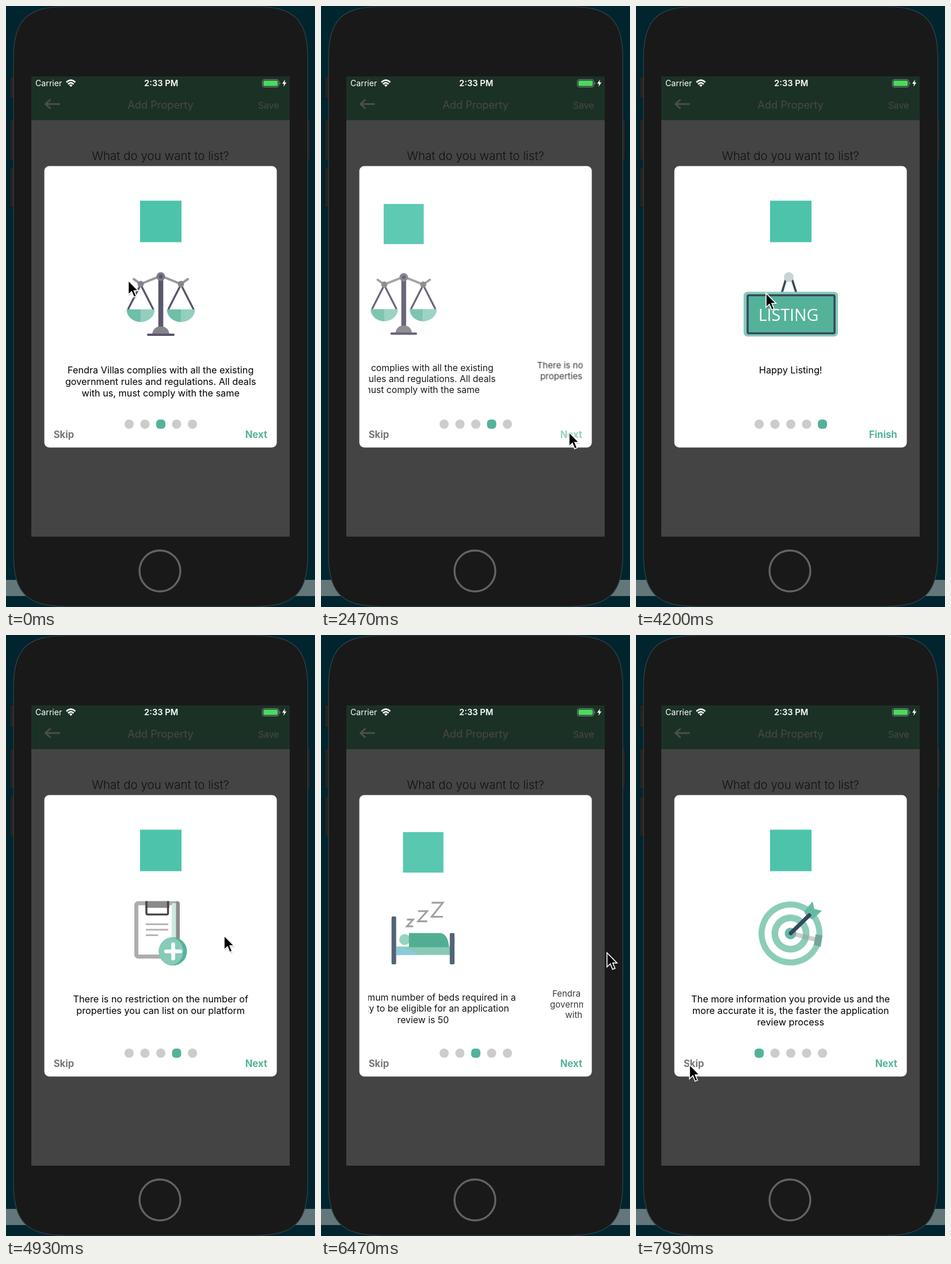
Recreate the animation shown at these times as an HTML page. Size 537 by 1042 pixels, loop 8000 ms.

```html
<!DOCTYPE html>
<html lang="en">
<head>
<meta charset="utf-8">
<title>Onboarding carousel</title>
<style>
  html, body { margin: 0; width: 100%; height: 100%; overflow: hidden; background: #01252f; }
  svg { display: block; width: 537px; height: 1042px; font-family: Inter, "Open Sans", sans-serif; }
  .caption { font-size: 16.25px; text-anchor: middle; fill: #000; }
  .btn { font-size: 16.7px; font-weight: 700; fill: #55b29a; }
  .nav { fill: #474947; }
  .end { text-anchor: end; }
  .mid { text-anchor: middle; }
  .line { fill: none; }
</style>
</head>
<body>
<svg viewBox="0 0 537 1042" xmlns="http://www.w3.org/2000/svg">
  <defs>
    <clipPath id="view"><rect x="82" y="278" width="374" height="430"/></clipPath>
    <clipPath id="badge"><circle cx="290" cy="548.5" r="24.5"/></clipPath>
  </defs>

  <!-- Backdrop and phone -->
  <rect width="537" height="1042" fill="#01252f"/>
  <rect y="995" width="537" height="28" fill="#63777a"/>
  <g fill="#222323" stroke="#101414">
    <rect x="6.5" y="121.5" width="9" height="39" rx="2"/>
    <rect x="6.5" y="196.5" width="9" height="71" rx="2"/>
    <rect x="6.5" y="279" width="9" height="70" rx="2"/>
    <rect x="521" y="196.5" width="8" height="70" rx="2"/>
  </g>
  <path d="M13 93c0-69 23-92 92-92H432.500c69 0 92 23 92 92V949c0 69-23 92-92 92H105c-69 0-92-23-92-92Z"
    fill="#191919" stroke="#34444a" stroke-width="1.2"/>
  <circle cx="267.5" cy="979.5" r="35.5" fill="none" stroke="#636363" stroke-width="3.4"/>

  <!-- Screen -->
  <rect x="44" y="122" width="449" height="798" fill="#444"/>
  <rect x="44" y="122" width="449" height="76" fill="#1c3126"/>
  <text x="51" y="139" font-size="14.2" fill="#fff">Carrier</text>
  <g class="line" stroke="#fff" stroke-width="2.7">
    <path d="M105 132.2Q112.7 125.2 120.4 132.2M107.8 135.4Q112.7 131 117.6 135.4"/>
  </g>
  <path d="M109.8 137.2Q112.7 134.8 115.6 137.2L112.7 140.3Z" fill="#fff"/>
  <text class="mid" x="269.7" y="139" font-size="14.7" font-weight="600" fill="#fff">2:33 PM</text>
  <rect x="445.5" y="127.5" width="28.5" height="13" rx="3.2" fill="none" stroke="#82908a"/>
  <rect x="447.3" y="129.2" width="25" height="9.6" rx="1.8" fill="#4cd95f"/>
  <path d="M475.5 131.7Q478 134 475.5 136.3Z" fill="#82908a"/>
  <path d="M485 127.5L480 134.8H483.2L482.3 140L487.3 132.5H484Z" fill="#fff"/>
  <path class="line" d="M93.5 170H68.5M77.5 162L68.5 170L77.5 178" stroke="#4c4f4d" stroke-width="2.8"/>
  <text class="nav mid" x="268.5" y="178" font-size="18.2">Add Property</text>
  <text class="nav end" x="474.5" y="177.5" font-size="15.8">Save</text>
  <text class="mid" x="268.5" y="267" font-size="20.5" font-weight="300" fill="#111">What do you want to list?</text>

  <!-- Card -->
  <rect x="66.6" y="277.5" width="404" height="488" rx="8.5" fill="#fff"/>
  <g id="slides" clip-path="url(#view)"></g>
  <g id="dots"></g>
  <text id="skip" class="btn" x="82.7" y="749" style="fill:#777">Skip</text>
  <text id="next" class="btn end" x="454" y="749">Next</text>

  <g id="cursor">
    <path d="M1 2V27L7 21.5L11 31L15 29L11 20H19Z" fill="#000" opacity=".18"/>
    <path d="M0 0V24.5L5.8 19.2L9.8 28.8L14 27L10 17.6H17.5Z" fill="#000" stroke="#fff" stroke-width="1.6"/>
  </g>
</svg>
<script>
const $ = id => document.getElementById(id);
const LOOP = 8000, PAGE = 374, CX = 269, CY = 509;

const pan = x => `<path d="M${x - 24.5} 526H${x}V548A24.5 22 0 0 1 ${x - 24.5} 526Z" fill="#6fbfa9"/>
  <path d="M${x + 24.5} 526H${x}V548A24.5 22 0 0 0 ${x + 24.5} 526Z" fill="#92cfbf"/>
  <path class="line" d="M${x - 22} 526L${x} 483L${x + 22} 526" stroke="#5a566b" stroke-width="3.4"/>
  <circle cx="${x}" cy="482" r="5.5" fill="#85838b"/>`;
const zed = (x, y, w, h, s) =>
  `<path class="line" d="M${x} ${y}h${w}l${-w} ${h}h${w}" stroke="#999" stroke-width="${s}"/>`;
const ring = (r, fill) => `<circle cx="268.5" cy="517.5" r="${r}" fill="${fill}"/>`;

const target = ring(55.5, '#8bcdb9') + ring(45, '#fff') + ring(33, '#8bcdb9') + ring(21.5, '#fff') + ring(10, '#65baa4') + `
  <path d="M269 517L312 528" stroke="#999f9d" stroke-opacity=".5" stroke-width="7.5"/>
  <path d="M312 519L324 521L321 541L309 537Z" fill="#6f9c90" opacity=".85"/>
  <path d="M297 489L292 479L307 462L310 475L323 478L307 493Z" fill="#65baa4"/>
  <path d="M269 517L301 486" stroke="#34495e" stroke-width="7" stroke-linecap="round"/>`;

const bed = `<path d="M221 541H317V556H221Z" fill="#7fc5b0"/>
  <path d="M221 542Q246 544 262 556H221Z" fill="#82c6dc"/>
  <circle cx="236" cy="528.5" r="9.7" fill="#8fd0bd"/>
  <path d="M243.5 517H299Q313 518 315 542H243.5Z" fill="#45a88b"/>
  <g fill="#44596b"><rect x="212.6" y="487.5" width="8.2" height="85" rx="2"/>
  <rect x="316.3" y="517" width="8.5" height="55.5" rx="2"/></g>`
  + zed(240, 493, 11, 12, 3.2) + zed(260, 478, 16, 18, 3.2) + zed(284, 463, 20, 25, 3.2);

const scales = `<g class="line" stroke="#9a999d" stroke-width="4">
  <path d="M222 473.5L234 482L269 468L304 482L316 473.5" stroke-linecap="round"/></g>
  <rect x="264.7" y="470" width="8.6" height="87" fill="#5a566b"/>${pan(234)}${pan(304)}
  <circle cx="269" cy="469" r="7.6" fill="#7f7c86"/><circle cx="269" cy="469" r="3.4" fill="#5a566b"/>
  <path d="M254 569Q256 555.5 269 555.5T284 569Z" fill="#85838a"/>
  <path d="M247 570H291" stroke="#5a566b" stroke-width="4" stroke-linecap="round"/>`;

const clipboard = `<rect x="226.5" y="465" width="72" height="92.5" rx="3" fill="#fff" stroke="#adadad" stroke-width="7"/>
  <path d="M288 465H296V556H288Z" fill="#cfe9e1"/>
  <path d="M295.5 461.5H298Q302 462 302 466V556H295.5Z" fill="#8b8b8b"/>
  <path d="M242 461.5H284V473H242Z" fill="#8b8b8b"/>
  <path d="M244 461.5V482Q244 484.5 246.5 484.5H279Q281.5 484.5 281.5 482V461.5" fill="none" stroke="#474747" stroke-width="3.6"/>
  <path d="M246 474H279.5V482.5H246Z" fill="#fff"/>
  <path d="M243 501.5H282M243 511H282M243 520.5H264" stroke="#b5b5b5" stroke-width="3.2"/>
  <g clip-path="url(#badge)"><rect x="264" y="522" width="54" height="54" fill="#55b29a"/>
  <circle cx="283" cy="548.5" r="25" fill="#85cbb8"/></g>
  <path d="M278 548.5H303M290.5 536V561" stroke="#fff" stroke-width="6.6" stroke-linecap="round"/>`;

const sign = `<path class="line" d="M253.5 497L262 469H269.5L278.5 497" stroke="#35495e" stroke-width="3.8"/>
  <circle cx="265.5" cy="470" r="8.5" fill="#c8d4d3"/>
  <rect x="187" y="495.5" width="164" height="77.5" rx="6.5" fill="#86cab7"/>
  <rect x="194" y="501.5" width="151" height="66" rx="2" fill="#55b29a" stroke="#35495e" stroke-width="3.6"/>
  <text x="265" y="546" class="mid" font-size="28.6" fill="#fff" style="font-family:'Open Sans','Noto Sans',sans-serif">LISTING</text>`;

const pages = [
  [target, 'The more information you provide us and the', 'more accurate it is, the faster the application', 'review process'],
  [bed, 'The minimum number of beds required in a', 'property to be eligible for an application', 'review is 50'],
  [scales, 'Fendra Villas complies with all the existing', 'government rules and regulations. All deals', 'with us, must comply with the same'],
  [clipboard, 'There is no restriction on the number of', 'properties you can list on our platform'],
  [sign, 'Happy Listing!']
];
$('slides').innerHTML = pages.map(([art, ...lines]) =>
  `<g><rect x="233" y="337.5" width="72" height="72" fill="#4dc3ab"/>${art}` +
  lines.map((s, i) => `<text class="caption" x="268.7" y="${637 + 20 * i}">${s}</text>`).join('') + '</g>').join('');
$('dots').innerHTML = pages.map((_, i) =>
  `<rect x="${206 + 27.5 * i}" y="717" width="16" height="16"/>`).join('');
const slides = [...$('slides').children], dots = [...$('dots').children];

const ease = {
  lin: u => u,
  out: u => 1 - (1 - u) ** 2,
  io: u => u * u * (3 - 2 * u)
};

// [time, page position, easing of the way there]
const scroll = [
  [0, 2], [430, 2], [640, 2.52, 'lin'], [950, 3, 'out'],
  [1050, 3], [1270, 2.47, 'lin'], [1620, 2, 'out'],
  [2400, 2], [2785, 3, 'out'],
  [3400, 3], [3620, 3.52, 'lin'], [3930, 4, 'out'],
  [4300, 4], [4520, 3.42, 'lin'], [4850, 3, 'out'],
  [5590, 3], [5800, 2.22, 'lin'], [6080, 2, 'out'],
  [6240, 2], [6470, 1.246, 'lin'], [6760, 1, 'out'],
  [6880, 1], [7080, .3, 'lin'], [7380, 0, 'out']
];
// [time, x, y, easing]
const pointer = [
  [0, 212.5, 476], [70, 212.5, 476], [400, 440, 490, 'io'], [430, 440, 490],
  [640, 246, 492, 'lin'], [760, 225, 495, 'out'], [1050, 313, 498, 'io'],
  [1270, 511, 500, 'lin'], [1500, 508, 510, 'io'], [2250, 431, 739, 'io'],
  [2600, 431, 739], [3130, 430, 506, 'io'], [3400, 430, 506],
  [3620, 236, 500, 'lin'], [3900, 226, 498, 'out'], [4300, 226, 498],
  [4520, 443, 510, 'lin'], [4650, 462, 514, 'out'], [5460, 163, 540, 'io'], [5590, 163, 540],
  [5800, 455, 545, 'lin'], [5900, 470, 546, 'out'], [6240, 215, 548, 'io'],
  [6470, 497, 551, 'lin'], [6560, 497, 551], [6880, 220, 545, 'io'],
  [7080, 482, 540, 'lin'], [7180, 482, 538], [7560, 317, 525, 'io'], [7890, 93, 745, 'io']
];
const active = [[0, 2], [880, 3], [1560, 2], [2400, 3], [3860, 4], [4780, 3], [6020, 2], [6690, 1], [7320, 0]];

function sample(keys, t, col, easeCol) {
  const i = keys.findIndex(k => k[0] > t);
  if (i < 0) return keys[keys.length - 1][col];
  const a = keys[i - 1], b = keys[i];
  const u = ease[b[easeCol] || 'lin']((t - a[0]) / (b[0] - a[0]));
  return a[col] + (b[col] - a[col]) * u;
}

function pressed(t) {
  if (t < 2330 || t > 2540) return 1;
  return t < 2400 ? .2 : .2 + .8 * (t - 2400) / 140;
}

function draw(t) {
  const pos = sample(scroll, t, 1, 2);
  slides.forEach((g, i) => {
    const d = i - pos, far = Math.min(1, Math.abs(d)), s = 1 - .1 * far;
    g.style.display = Math.abs(d) < 1.2 ? '' : 'none';
    g.setAttribute('opacity', 1 - .3 * far);
    g.setAttribute('transform', `translate(${CX + PAGE * d} ${CY}) scale(${s}) translate(${-CX} ${-CY})`);
  });
  const on = active.filter(k => k[0] <= t).pop()[1];
  dots.forEach((dot, i) => {
    dot.setAttribute('rx', i === on ? 6 : 8);
    dot.setAttribute('fill', i === on ? '#55b29a' : '#ccc');
  });
  const last = on === pages.length - 1;
  $('skip').style.display = last ? 'none' : '';
  $('next').textContent = last ? 'Finish' : 'Next';
  $('next').setAttribute('opacity', pressed(t));
  $('cursor').setAttribute('transform', `translate(${sample(pointer, t, 1, 3)} ${sample(pointer, t, 2, 3)})`);
}

const start = performance.now();
function tick() {
  draw((performance.now() - start) % LOOP);
  requestAnimationFrame(tick);
}
tick();
</script>
</body>
</html>
```
